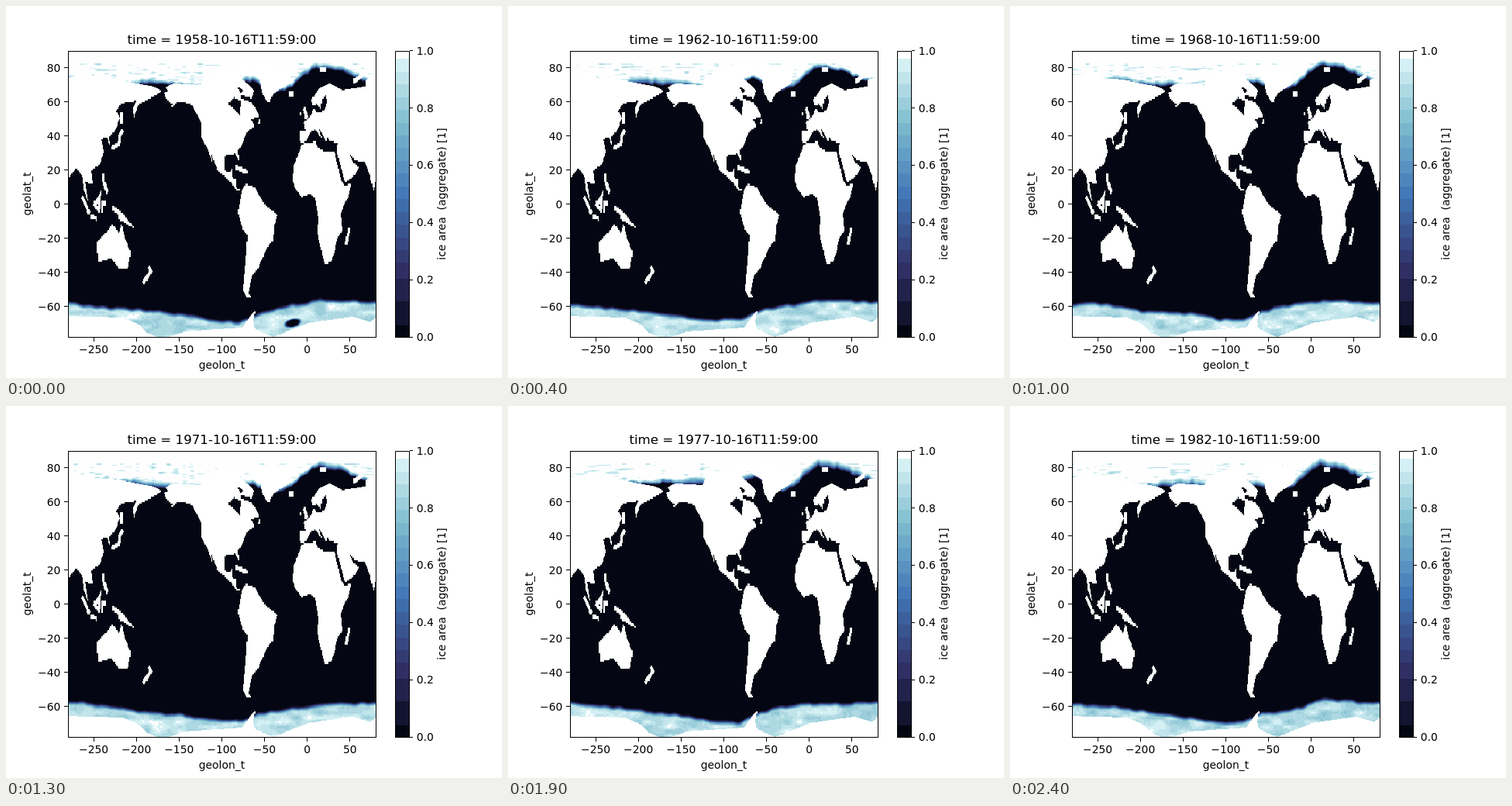
Write an HTML page with a canvas that moves like this. It is 640 px wide and 480 px high and loops after 2.5 s.

```html
<!DOCTYPE html>
<html lang="en">
<head>
<meta charset="utf-8">
<title>Ice area by year</title>
<style>
html, body { margin: 0; width: 100%; height: 100%; overflow: hidden; background: #fff; }
canvas { position: absolute; left: 80px; top: 58px; width: 397px; height: 369px; image-rendering: pixelated; }
svg { position: absolute; left: 0; top: 0; }
text { font: 13.89px "DejaVu Sans", sans-serif; fill: #000; white-space: pre; }
#title { font-size: 16.67px; }
.line { fill: none; stroke: #000; stroke-width: 1; shape-rendering: crispEdges; }
.band { shape-rendering: crispEdges; }
</style>
</head>
<body>
<canvas id="map" width="360" height="336"></canvas>
<svg id="plot" width="640" height="480" viewBox="0 0 640 480"></svg>
<script>
const COLS = 360, ROWS = 336, YEARS = 25, STEP = 100;

// Key coast points as longitude, latitude.
const land = {
  eurasia: "-6,36 -9,37 -9,43 -2,43.5 -4,48.5 4,52 8.5,57 10.5,54 20,55 23,59.5 22,64.5 25,65.5 17,62 16,56.5 11,59 6,58 5,62 14,68 26,71 41,67 68,69 68,73 87,75 104,77.5 113,74 140,73 180,69 190,66.5 178,63 163,59 157,51 156,57 160,61 143,59.5 136,55 141,51 135,43.5 128,39.5 129,35 125,39.5 119,38.5 122,31 117,23.5 107,20 109,12 100,13.5 104,1.5 98,9 97,16 90,22 80,15 77.5,8 73,18 67,25 57,26 49,30 55,24 60,22 55,17 44,13 41,19 36,28 34.5,31 36,36.5 27,37 24,40 22,37 13,45.5 17,39 9,44 3,42 -2,37",
  africa: "-6,35.5 10,37 11,34 20,31 32,31 36,22 39,15 43,11.5 51,12 48,5 39,-5 41,-15 35,-20 32,-28 27,-34 20,-35 12,-17 13,-8 9,4 4,6.5 -7,4.5 -13,8.5 -17,14 -16,22 -9,32",
  northAmerica: "-168,65.5 -162,66.5 -166,68.5 -157,71 -125,70 -120,75 -85,82 -62,82 -80,75 -68,70 -62,66.5 -65,62.5 -78,64.5 -78,62.5 -65,60 -56,52 -66,50 -61,46 -70,43 -76,36 -81,31.5 -80,25.5 -84,30 -97,28.5 -97,20 -91,19 -88,21.5 -88,16 -83.5,15 -83,10 -77,8 -83,8.5 -92,14.5 -105,20 -113,31 -110,23.5 -117,33 -124,40 -124,48 -134,58 -145,60.5 -152,60 -164,55 -157,58.5 -165,62",
  southAmerica: "-77,8 -72,12 -62,10.5 -50,0 -35,-6 -39,-13 -40,-21 -48,-26 -57,-37 -65,-42 -69,-52 -65,-55 -71,-54.5 -75,-50 -71.5,-30 -70,-18 -76,-14 -81,-5",
  greenland: "-73,78.5 -55,73 -53,66 -48,61 -44,60 -40,65 -22,70.5 -18,79 -12,81.5 -60,82",
  australia: "114,-22 115,-34 131,-31.5 140,-38 150,-37.5 153.5,-28 146,-19 142.5,-11 140,-17 132,-11.5 122,-18",
  antarctica: "-280,-65.6 -216,-66.5 -196,-71 -189,-75 -176,-78 -162,-78 -144,-75 -76,-72.5 -66,-65 -61,-63 -63,-69 -61,-73.5 -40,-78 0,-70 53,-66 74,-69.5 80,-66 80,-79 -280,-79"
};
const islands = {
  japan: "131,33 140,36 141,41 144,44",
  sakhalin: "142,47 143,54",
  philippines: "121,18 122,13 126,7",
  sumatra: "96,5 105,-5",
  java: "106,-7 114,-8",
  borneo: "110,1 116,-3 117,5 112,0",
  sulawesi: "120,-5 120,1 124,1",
  newGuinea: "132,-2 141,-5 149,-10 139,-7",
  newZealand: "174,-36 177,-39 168,-46",
  madagascar: "49,-14 45,-24",
  cuba: "-84,22 -70,19",
  newfoundland: "-57,49 -55,48",
  iceland: "-22,65 -16,65",
  britain: "-3,51 -1,52 -4,57",
  ireland: "-8,52 -8,54",
  svalbard: "15,79 22,79",
  novayaZemlya: "54,72 65,76"
};
const bays = {
  hudson: "-93,59 -86,63 -78,61 -79,52 -83,55",
  foxe: "-82,69 -75,67 -78,65"
};

// Mean ice edges: stage x, stage y.
const northMean = "81,104 190,104 262,107 318,98 345,112 368,105 384,90 400,79 430,83 477,103";
const southMean = "81,380 150,387 215,394 270,402 300,402 325,392 375,384 405,378 477,381";

const clamp = v => Math.max(0, Math.min(1, v));
const mix = (a, b, t) => a + (b - a) * t;
const ease = t => t * t * (3 - 2 * t);
const points = s => s.split(" ").map(p => p.split(",").map(Number));

function along(pts, x) {
  let i = 0;
  while (i < pts.length - 2 && x > pts[i + 1][0]) i++;
  const [a, b] = [pts[i], pts[i + 1]];
  return mix(a[1], b[1], clamp((x - a[0]) / (b[0] - a[0])));
}

function hash(x, y, seed) {
  let h = Math.imul(x, 374761393) + Math.imul(y, 668265263) + Math.imul(seed + 7, 982451653);
  h = Math.imul(h ^ (h >>> 13), 1274126177);
  return ((h ^ (h >>> 16)) >>> 0) / 4294967296;
}

function noise(x, y, seed) {
  const i = Math.floor(x), j = Math.floor(y), u = ease(x - i), v = ease(y - j);
  return mix(mix(hash(i, j, seed), hash(i + 1, j, seed), u),
             mix(hash(i, j + 1, seed), hash(i + 1, j + 1, seed), u), v);
}

// Colour scale in flat bands.
const ramp = [[4, 6, 19], [50, 50, 105], [66, 120, 184], [126, 189, 206], [234, 253, 253]];
const limits = [0, .043, .125, .205, .26];
for (let k = 1; k <= 16; k++) limits.push(.26 + .0445 * k);
limits.push(1);

function bandColor(i) {
  if (i === 0) return ramp[0];
  if (i === limits.length - 2) return [254, 254, 254];
  const p = (limits[i] + limits[i + 1]) * 2, k = Math.floor(p);
  return ramp[k].map((c, n) => Math.round(mix(c, ramp[k + 1][n], p - k)));
}
const bands = limits.slice(1).map((_, i) => bandColor(i));

function shade(v) {
  let i = 0;
  while (i < bands.length - 1 && v > limits[i + 1]) i++;
  return bands[i];
}

function makeMask() {
  const c = document.createElement("canvas");
  c.width = COLS;
  c.height = ROWS;
  const g = c.getContext("2d");
  g.setTransform(1, 0, 0, -2, 280, 180);
  g.lineWidth = 2.8;
  const trace = (shapes, paint) => {
    for (const outline of Object.values(shapes)) {
      for (const shift of [0, -360]) {
        g.beginPath();
        for (const [lon, lat] of points(outline)) g.lineTo(lon + shift, lat);
        g[paint]();
      }
    }
  };
  trace(land, "fill");
  trace(islands, "stroke");
  g.globalCompositeOperation = "destination-out";
  trace(bays, "fill");
  const data = g.getImageData(0, 0, COLS, ROWS).data;
  return (i, j) => {
    const row = j > 50 && j < 300 ? j & ~1 : j;
    return data[(row * COLS + i) * 4 + 3] > 115;
  };
}

const northEdge = points(northMean), southEdge = points(southMean);

function northIce(x, y, year) {
  const swing = x < 340 ? 10 : 4;
  const edge = along(northEdge, x) + swing * (noise(x / 40, 0, year) - .5) + 3 * (noise(x / 5, 9, year) - .5);
  const t = clamp((edge - y) / (5 + 8 * noise(x / 35, 3, year)));
  const streak = y > 74 ? Math.max(0, noise(x / 10, y / 1.5, year + 60) - .72) : 0;
  return 1 - (1 - t) ** 1.6 - (t > .5 ? streak * .6 : 0);
}

function southIce(x, y, year) {
  const edge = along(southEdge, x) + 7 * (noise(x / 60, 5, year) - .5) + 3 * (noise(x / 9, 5, year) - .5);
  const t = ease(clamp((y - edge) / 8));
  const pack = .76 + .2 * noise(x / 15, y / 6, year + 90) + .05 * noise(x / 3, y / 3, year);
  // Open water that closes after the first year.
  const size = Math.exp(-year * 1.5);
  const d = Math.hypot((x - 370) / 11, (y - 409 + (x - 370) * .2) / 6) / size;
  return t * pack * ease(clamp((d - .55) / .6));
}

const isLand = makeMask();
const ctx = document.getElementById("map").getContext("2d");
const cache = [];

function mapFor(year) {
  if (cache[year]) return cache[year];
  const img = ctx.createImageData(COLS, ROWS);
  for (let j = 0; j < ROWS; j++) {
    const y = 58 + (j + .5) * 369 / ROWS;
    for (let i = 0; i < COLS; i++) {
      const x = 80 + (i + .5) * 397 / COLS, k = (j * COLS + i) * 4;
      let rgb = [255, 255, 255];
      if (!isLand(i, j)) {
        rgb = shade(y < 120 ? northIce(x, y, year) : y > 365 ? southIce(x, y, year) : 0);
      }
      img.data.set(rgb, k);
      img.data[k + 3] = 255;
    }
  }
  return cache[year] = img;
}

const plot = document.getElementById("plot");
function add(tag, attrs, content = "") {
  const el = document.createElementNS("http://www.w3.org/2000/svg", tag);
  for (const name in attrs) el.setAttribute(name, attrs[name]);
  el.textContent = content;
  plot.append(el);
  return el;
}
const label = (s, x, y, anchor, extra = {}) => add("text", { x, y, "text-anchor": anchor, ...extra }, s);
const line = d => add("path", { d, class: "line" });
const signed = n => String(n).replace("-", "\u2212");
const upright = (s, x, y) => label(s, 0, 0, "middle", { transform: `translate(${x} ${y}) rotate(-90)` });

bands.forEach((rgb, i) => {
  const [y, base] = [limits[i + 1], limits[i]].map(v => Math.round(427.5 - v * 369.5));
  add("rect", { x: 502, y, width: 18, height: base - y, fill: `rgb(${rgb})`, class: "band" });
});
line("M80.5 58.5H477.5V427.5H80.5Z");
line("M502.5 58.5H520.5V427.5H502.5Z");
for (let lon = -250; lon <= 50; lon += 50) {
  const x = 80 + (lon + 280) * 1.1022;
  line(`M${Math.floor(x) + .5} 428v5`);
  label(signed(lon), x, 448, "middle");
}
for (let lat = -60; lat <= 80; lat += 20) {
  const y = 255.6 - lat * 2.2;
  line(`M75 ${Math.floor(y) + .5}h5`);
  label(signed(lat), 70.3, y + 5, "end");
}
for (let k = 0; k <= 5; k++) {
  const y = 427.2 - k * 73.92;
  line(`M521 ${Math.floor(y) + .5}h4`);
  label((k / 5).toFixed(1), 529.8, y + 5, "start");
}
label("geolon_t", 278.4, 468, "middle");
upright("geolat_t", 32, 242.5);
upright("ice area  (aggregate) [1]", 567, 242.5);
const title = label("", 278.4, 49, "middle", { id: "title" });

const start = performance.now();
let shown = -1;
function draw() {
  const year = Math.floor((performance.now() - start) / STEP) % YEARS;
  if (year !== shown) {
    shown = year;
    ctx.putImageData(mapFor(year), 0, 0);
    title.textContent = `time = ${1958 + year}-10-16T11:59:00`;
  }
  requestAnimationFrame(draw);
}
draw();
</script>
</body>
</html>
```
